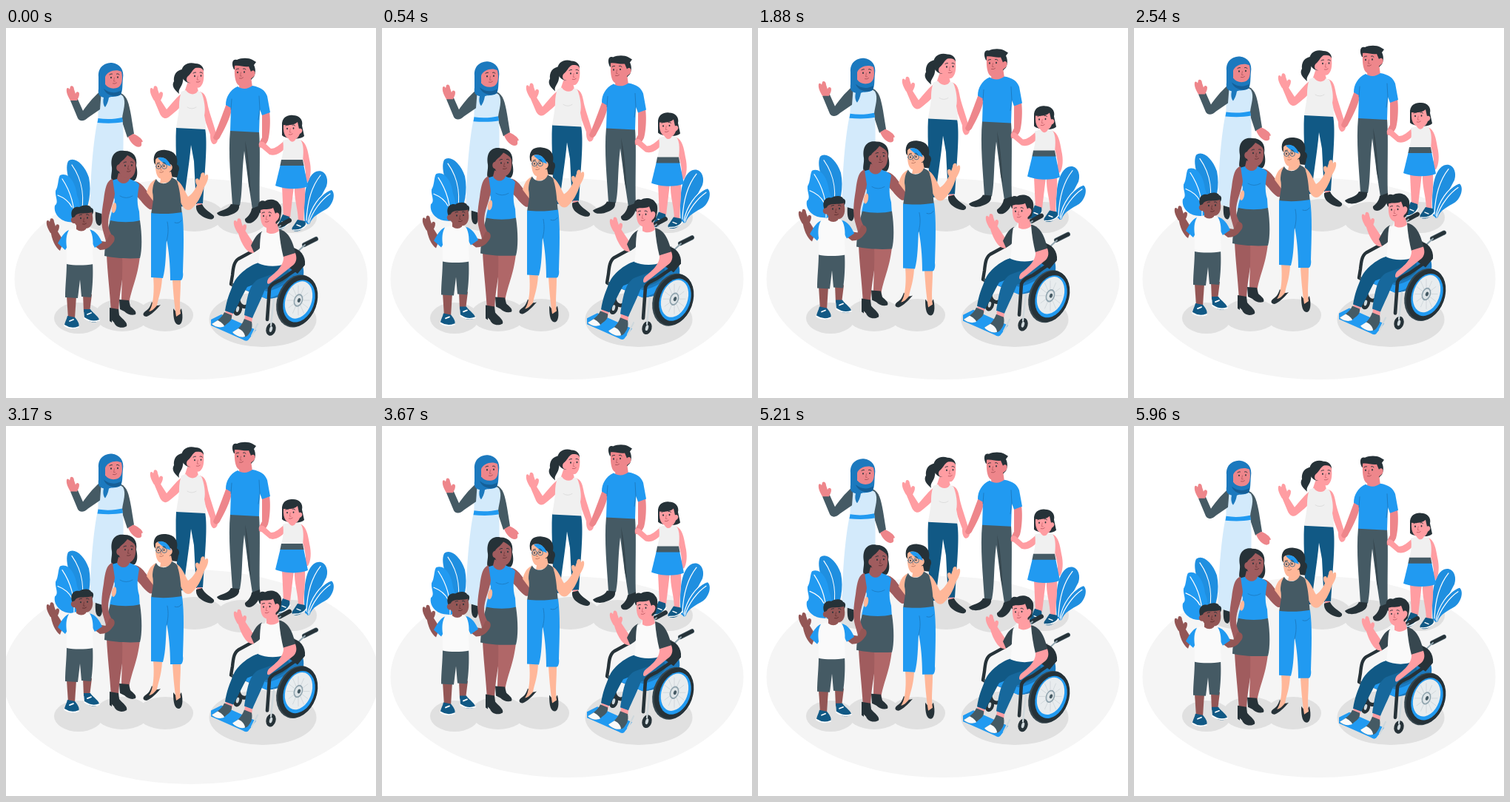
Recreate the animation shown at these times as an HTML page with a canvas. Size 500 by 500 pixels, loop 6000 ms.

```html
<!DOCTYPE html>
<html lang="en">
<head>
<meta charset="utf-8">
<title>People waving</title>
<style>
html, body { margin: 0; width: 100%; height: 100%; overflow: hidden; background: #fff; }
canvas { display: block; width: 500px; height: 500px; }
</style>
</head>
<body>
<canvas id="stage"></canvas>
<script>
const BLUE = '#219af1', DEEP = '#1c79be', LEAF = '#1f8fe0', NAVY = '#115985', PALE = '#d3eafb';
const GREY = '#455a64', DARK = '#37474f', INK = '#263238', SHADE = '#e0e0e0', WHITE = '#fafafa', TOP = '#f0f0f0';
const PINK = '#ff9da2', ROSE = '#ee868b', BROWN = '#a05c5e', UMBER = '#935655', PEACH = '#ffb799';

// Rows are [colour, path] for a fill and [colour, path, width] for a line.
function oval(x, y, rx, ry, deg = 0) {
  const a = deg * Math.PI / 180, dx = rx * Math.cos(a), dy = rx * Math.sin(a);
  return `M${x - dx} ${y - dy}a${rx} ${ry} ${deg} 1 0 ${2 * dx} ${2 * dy}a${rx} ${ry} ${deg} 1 0 ${-2 * dx} ${-2 * dy}Z`;
}

function face(x, y, gap, line) {
  return [
    [INK, oval(x, y, 0.9, 1.2)],
    [INK, oval(x + gap, y - 0.5, 0.9, 1.2)],
    [INK, `M${x - 2} ${y - 4}q2-1.5 3.5-1M${x + gap - 1.5} ${y - 5}q2-1 3.5 1`, 0.9],
    [line, `M${x + gap / 2} ${y}l-1 5h2`, 0.6],
    [line, `M${x + gap / 2 - 2} ${y + 8}q3 1 5-1`, 0.8]
  ];
}

// Raised hand above a wrist; flip is -1 to put the thumb on the left.
function hand(x, y, flip = 1) {
  const f = n => n * flip;
  return `M${x - f(4)} ${y}c${f(-3)}-5 ${f(-6)}-11 ${f(-5)}-16c${f(1)}-2 ${f(3)}-1 ${f(4)} 1l${f(1)}-4` +
    `c${f(2)}-2 ${f(5)} 0 ${f(5)} 4l${f(2)} 6c${f(1)}-4 ${f(5)}-3 ${f(5)} 0c0 4 ${f(-2)} 6 ${f(-3)} 9Z`;
}

function group(rise, ...rows) {
  return { rise, rows: rows.map(([c, d, w]) => ({ c, w, path: new Path2D(d) })) };
}

const shadows = group(0,
  [SHADE, oval(98, 392, 33, 21)], [SHADE, oval(157, 388, 37, 22)], [SHADE, oval(215, 388, 38, 22)],
  [SHADE, oval(136, 254, 34, 20)], [SHADE, oval(254, 253, 40, 22)], [SHADE, oval(318, 257, 35, 22)],
  [SHADE, oval(387, 256, 33, 21)], [SHADE, oval(347, 394, 72.5, 37)]);

const plants = group(10,
  [LEAF, 'M84 180C92 173 106 184 112 202C116 222 112 242 102 262L92 262C98 240 92 224 86 208C82 196 81 186 84 180Z'],
  [BLUE, 'M73 199C84 194 94 208 96 226C102 240 100 254 94 263L84 262C72 260 64 250 66 240C72 236 66 228 67 220C71 214 70 204 73 199Z'],
  ['#fff', 'M89 185C104 206 107 232 100 258M76 204C88 222 93 242 92 262M70 226C80 230 86 236 89 242', 1.2],
  [LEAF, 'M404 262C402 238 402 202 419 194C430 190 437 202 433 214C424 232 414 246 408 265Z'],
  [LEAF, 'M407 265C412 240 428 222 440 219C446 224 442 238 434 244C424 250 414 254 410 265Z'],
  ['#fff', 'M408 262C412 242 424 226 437 219M425 199C413 214 407 236 406 260M438 224C426 232 414 248 409 264', 1.2]);

const scarfWoman = group(10,
  [INK, 'M121 246L129 250C131 258 130 264 127 267C122 267 120 262 121 246Z'],
  [GREY, 'M155 88C164 92 166 102 169 118L173 143L164 148L154 118Z'],
  [ROSE, 'M165 147L172 143C177 145 184 149 185 154C181 153 185 158 182 160C177 163 169 157 165 147Z'],
  [PALE, 'M126 93C134 88 152 86 158 92C163 100 158 112 157 122C160 140 158 170 158 200L157 258C140 254 124 250 114 246C113 210 118 150 124 124C126 112 122 100 126 93Z'],
  [BLUE, 'M124.500 122C136 124 148 123 157 121L158 127C148 129 136 129 123.500 128Z'],
  [GREY, 'M129 84C116 95 108 106 104 112L96 94L87 98L97 122C100 127 106 126 111 121L127 110Z'],
  [ROSE, hand(91, 98)],
  [DEEP, 'M125 66C124 52 134 47 143 47C154 48 160 57 158 68C157 78 158 84 155 90C150 94 142 92 139 94C138 100 136 104 134 107C131 104 131 98 132 94C126 92 124 90 125 82Z'],
  ['#155f98', 'M132 82C140 89 150 88 156 84L155 90C148 94 136 92 132 82Z'],
  [ROSE, 'M134 66C137 58 149 55 156 59C158 68 157 77 152 80C146 83 138 82 134 76Z'],
  ...face(142, 67, 9, '#9c4a50'));

const family = group(20,
  // Woman with ponytail
  [INK, 'M240 56C230 56 226 64 227 72C223 78 228 84 234 89C232 82 238 80 239 72C240 66 242 62 240 56Z'],
  [NAVY, 'M230 134L269 136C272 150 270 180 268 206L266 237L257 238L254 180L250 158C247 190 242 216 240 241L230 242C233 206 228 166 230 134Z'],
  [PINK, 'M258 237h7v5h-7z'],
  [INK, 'M257 240L265 238C268 246 278 250 281 254C282 259 276 260 268 256C262 253 256 248 257 240Z'],
  [PINK, 'M262 86C270 88 271 96 273 106C276 118 282 134 285 146C288 152 284 158 280 157C276 154 276 148 276 144C270 128 264 112 262 100Z'],
  [PINK, 'M246 72L258 78L261 90L240 90Z'],
  [PINK, 'M208 96L217 110C224 102 232 92 240 86L244 100C234 108 226 116 219 121C214 124 210 120 208 116L200 97Z'],
  [PINK, hand(204, 98)],
  [TOP, 'M237 86L243 84C247 91 257 91 259 85L264 87C268 96 270 110 268 118C270 126 270 132 270 137L230 135C232 122 234 112 234 104C234 98 235 92 237 86Z'],
  ['#d8d8d8', 'M245 107q6 4 12 0', 0.8],
  [INK, 'M237 62C236 50 246 45 256 48C264 48 268 54 267 60L250 74C244 75 238 70 237 62Z'],
  [PINK, 'M246 65C250 62 252 56 256 54C261 53 266 54 267 58C268 68 267 76 262 80C258 82 251 79 249 74C243 74 243 67 246 65Z'],
  ...face(255, 65, 8.5, '#b8545e'),
  // Man
  [GREY, 'M303 138L342 140C344 168 342 210 343 241L333 245L328 212L322 166C318 200 320 220 316 240L306 239C304 206 300 170 303 138Z'],
  [DARK, 'M323 152L328 212L331 224C329 196 328 172 323 152Z'],
  [INK, 'M304 238L315 239C316 246 312 250 302 253C294 256 286 254 285 250C290 246 300 246 304 238Z'],
  [INK, 'M332 244L343 240C345 250 340 258 334 262C328 266 322 263 323 258C328 254 331 250 332 244Z'],
  [ROSE, 'M298 102L306 106C304 118 298 132 290 146C288 152 282 154 280 148C284 140 292 118 298 102Z'],
  [ROSE, 'M346 116L356 113C358 128 356 146 354 152C350 160 346 163 342 161C341 156 344 152 346 148Z'],
  [ROSE, 'M316 72L331 66L333 80C328 86 320 86 315 80Z'],
  [BLUE, 'M313 79C320 84 328 82 333 78C344 80 350 84 353 92L357 114L346 118L343 110L342 141L303 139L304 108L297 104C297 94 302 84 313 79Z'],
  [DEEP, 'M342 92L343 110L341 124M305 96L304 110', 0.9],
  [INK, 'M308 56C304 48 306 41 312 43C318 40 328 40 333 43L338 46L335 50C338 56 337 62 335 66L331 70L326 56Z'],
  [ROSE, 'M309 51C315 50 322 53 328 52L331 59C334 56 338 58 336 64C334 67 332 67 331 69C331 76 326 80 320 79C312 79 308 72 309 51Z'],
  ...face(313, 60, 9, '#9c4a50'),
  // Girl
  [PINK, 'M373 214H389L384 256H375Z'], [PINK, 'M390 214H404C405 232 402 246 402 263H395C395 244 389 232 390 214Z'],
  [NAVY, 'M374 252L383 255C385 262 380 268 372 272C366 274 364 270 368 265Z'],
  [NAVY, 'M394 259L404 261C407 266 402 272 396 274C388 276 384 272 388 268Z'],
  ['#fff', 'M368 271Q378 271 384 261M388 273Q400 274 406 266M373 262l5 2M393 266l5 2', 1.4],
  [PINK, 'M376 152C370 158 364 163 358 163L348 154C343 152 340 156 343 160L356 171C364 174 372 168 378 162Z'],
  [PINK, 'M397 151C406 154 408 166 410 178C413 190 412 202 408 208C403 209 402 203 405 196C404 184 400 172 397 166Z'],
  [PINK, 'M382 146h10v10h-10z'],
  [TOP, 'M374 152L382 150C385 155 390 155 392 149L398 151C403 158 402 170 401 180L372 180C374 170 376 162 374 152Z'],
  [BLUE, 'M371 184L402 184L408 214C396 219 376 218 364 213Z'],
  [GREY, 'M372 178H401L402.500 186H370.500Z'],
  [INK, 'M373 132C372 120 382 117 388 118C396 118 402 124 400 132L403 146C400 149 394 150 388 149C382 149 376 148 373 145Z'],
  [PINK, 'M375 131C382 132 390 131 394 127L396 136C401 134 402 141 397 143C395 149 391 151 387 151C379 150 374 145 375 131Z'],
  ...face(380, 136, 8.5, '#b8545e'));

const trio = group(20,
  // Woman in skirt
  [BROWN, 'M136 306H160C160 334 154 348 152 384H142C140 352 137 330 136 306Z'],
  ['#b06768', 'M157 308L181 308C178 338 169 352 166 374L156 374C156 350 158 330 157 308Z'],
  [INK, 'M140 378L152 380L153 388C158 394 165 398 163 403C156 407 148 404 146 398L143 395V398L140 396Z'],
  [INK, 'M153 367L166 368L168 376C172 380 177 383 175 387C170 389 164 387 160 383L154 380Z'],
  [INK, 'M143 188C140 170 150 164 160 166C172 166 178 174 176 186C178 194 178 202 174 206L146 207C139 206 144 196 143 188Z'],
  [BROWN, 'M152 196L167 201L170 212L148 212Z'],
  [BROWN, 'M175 207C186 210 192 224 199 232C203 238 201 247 194 245C186 240 182 232 177 228Z'],
  [BLUE, 'M143 206L150 204C154 212 164 212 167 204C172 206 178 208 180 212C178 224 176 234 180 248L181 264L140 264C141 250 147 240 147 232C143 222 142 214 143 206Z'],
  [DEEP, 'M154 227q8 5 17 0', 0.8],
  [GREY, 'M141 260C154 263 170 263 181 260C184 280 184 300 181 311C164 312 146 311 133 308C134 290 136 276 141 260Z'],
  [BROWN, 'M144 204C136 206 134 216 132 232C129 250 128 262 131 274L135 288C138 294 144 292 145 284C142 278 138 272 138 264C138 250 146 236 147 224Z'],
  [PEACH, oval(146, 243, 3, 7, 10)],
  [BROWN, 'M153 184C155 180 160 178 164 172C168 174 174 177 175 182C176 192 174 200 168 203C160 204 154 199 153 194C148 193 148 185 153 184Z'],
  ...face(161, 186, 9, '#5e3032'),
  // Woman with glasses
  [INK, 'M197 370C200 375 204 376 209 374C204 380 196 388 190 390C185 390 184 386 188 383C193 380 195 376 197 370Z'],
  [INK, 'M226 379C230 385 234 384 237 379C240 392 238 400 234 401C228 401 226 394 226 379Z'],
  [PEACH, 'M199 336L211 338C210 356 206 364 204 375C200 380 196 383 193 383C198 378 201 360 199 336Z'],
  [PEACH, 'M225 340H236C236 362 234 370 236 386L230 390C227 370 226 356 225 340Z'],
  [PEACH, 'M203 204C194 208 192 216 190 222L199 234Z'],
  [PEACH, 'M228 204C238 208 242 222 246 228C252 224 256 218 259 210L268 214C264 228 258 238 250 245C244 248 240 244 236 236Z'],
  [PEACH, hand(264, 215, -1)],
  [INK, 'M200 182C198 168 206 164 216 165C228 166 233 174 231 184C234 190 233 197 231 202L212 200Z'],
  [INK, oval(231, 190, 3, 5)],
  [PEACH, 'M210 198L223 194L226 208L208 210Z'],
  [GREY, 'M203 204C206 212 220 213 224 202C228 204 232 206 232 210C236 222 236 236 238 252L196 252C198 238 200 232 198 222C198 214 200 208 203 204Z'],
  [BLUE, 'M196 250C210 252 226 251 238 249C241 270 240 300 239 330C240 336 238 341 236 341L222 341C222 320 220 300 217 286C216 304 216 324 212 338L196 337C196 318 196 270 196 250Z'],
  [DEEP, 'M218 262C220 272 219 280 217 288M228 263q6 2 9-3', 0.9],
  [PEACH, 'M202 178C204 174 210 174 216 177L221 184C226 184 226 192 221 194C220 200 217 204 213 204C206 205 201 200 202 178Z'],
  [BLUE, 'M205 176C212 172 220 178 223 187C216 185 210 181 205 176Z'],
  ...face(206, 187, 7.5, '#b06a58'),
  [NAVY, oval(206, 187, 3.2, 3.4), 0.7], [NAVY, oval(214, 187, 3.4, 3.4), 0.7],
  // Boy
  [UMBER, 'M82 362H95L93 393H84Z'], [UMBER, 'M104 360H116L113 384H105Z'],
  [NAVY, 'M83 389L93 391C97 396 100 400 98 404C92 408 82 406 79 401C80 396 82 394 83 389Z'],
  [NAVY, 'M105 380L114 380C118 386 126 390 126 395C120 400 110 397 106 391Z'],
  ['#fff', 'M79 402Q88 408 98 404M106 392Q116 399 126 395M86 396l5-2M110 387l5-2', 1.8],
  [GREY, 'M82 316L117 316C118 334 117 350 115 364L102 363L100 340L97 365L80 364C80 348 82 334 82 316Z'],
  [UMBER, hand(64, 277)],
  [UMBER, 'M60 273L68 272L78 288L73 301C66 296 62 286 60 273Z'],
  [UMBER, 'M119 294L129 288L135 289L140 279C147 278 149 286 144 291C140 297 134 300 127 300Z'],
  [BLUE, 'M85 273C78 276 74 284 70 291L80 300L90 284Z'],
  [BLUE, 'M112 272C122 274 126 282 130 290L120 297L114 286Z'],
  [WHITE, 'M85 273C92 270 106 268 113 272C118 280 118 290 117 300L118 319C106 321 92 321 82 319V296C81 288 81 280 85 273Z'],
  [UMBER, 'M95 266h13v6q-6 5-13 0z'],
  [INK, 'M91 260C85 249 90 240 99 242C105 238 114 239 115 243C119 244 119 249 116 253Z'],
  [UMBER, 'M93 255C96 248 108 252 116 249C119 260 117 270 108 271C98 272 95 267 93 264C87 265 86 256 91 256Z'],
  ...face(101, 257, 9, '#55292a'));

function spokes(x, y) {
  let d = '';
  for (let i = 0; i < 12; i++) {
    const a = i * Math.PI / 6;
    d += `M${x} ${y}l${15 * Math.cos(a)} ${20 * Math.sin(a)}`;
  }
  return d;
}

const wheelchair = group(10,
  [INK, 'M370 267L383 260', 6], [GREY, 'M403 293L419 285', 6], [INK, 'M403 293L419 285', 4.5],
  ['#90a4ae', 'M390 306L404 293M362 274L371 267', 2],
  [INK, oval(313, 380, 6, 9, 15)], ['#cfd8dc', oval(313, 380, 2, 4, 15)],
  [INK, oval(325, 360, 11, 17, 15), 5],
  [DEEP, 'M378 300C394 310 404 318 402 334C396 354 372 366 352 366L318 352L340 328Z'],
  [BLUE, 'M330 346L352 356C364 354 376 348 386 340L384 350C374 358 362 364 352 366L320 352Z'],
  [INK, 'M384 296C398 298 405 308 404 320L394 332L380 322Z'],
  [INK, 'M336 300L314 312C308 316 307 324 306 334L304 346L316 352', 4.4],
  [GREY, 'M306 346L312 372', 2.2],
  [BLUE, 'M277 394L291 387L338 408L327 422Q324 424 320 421L277 402Z'],
  [PINK, 'M297 380L307 384L305 392L296 389Z'], [PINK, 'M323 387L333 391L332 400L322 397Z'],
  [NAVY, 'M342 317C330 320 314 332 308 344C302 358 298 368 296 382L307 386C313 376 319 362 326 350L352 340C362 336 376 330 378 318Z'],
  ['#17689c', 'M378 317C374 332 352 334 340 340C328 348 326 364 322 388L333 392C338 380 346 364 350 353C362 350 378 345 384 334Z'],
  [GREY, 'M295 384L305 388C306 396 300 398 296 402C290 406 282 404 278 400C284 396 292 392 295 384Z'],
  [GREY, 'M322 393L332 397C334 406 330 412 326 416C320 420 310 416 306 411C312 408 318 404 322 393Z'],
  [WHITE, 'M286 395C290 397 294 400 295 403C290 406 282 404 278 400Z'],
  [WHITE, 'M314 406C319 408 323 413 323 417C318 419 310 416 306 411Z'],
  [PINK, 'M312 270L322 272L334 290L335 304C324 305 316 288 312 270Z'],
  [PINK, hand(317, 277)],
  [DARK, 'M346 275C338 278 334 288 331 294L335 303C342 300 345 296 347 290Z'],
  [WHITE, 'M345 276C352 278 364 276 370 272C377 284 379 306 378 318C366 324 350 322 341 318C344 304 342 288 345 276Z'],
  [PINK, 'M352 266L366 262L369 274C364 279 356 279 352 276Z'],
  [DARK, 'M369 272C382 274 388 290 391 304L375 310C372 298 370 286 369 272Z'],
  [PINK, 'M375 309L391 304C394 312 392 318 386 322C376 330 366 338 358 344C352 349 352 342 355 338C362 332 376 322 375 309Z'],
  [INK, 'M343 250C337 238 343 231 350 234C356 230 366 232 369 237C375 242 371 254 370 260L365 265L358 248Z'],
  [PINK, 'M344 246C349 244 356 246 361 243L364 251C367 247 372 252 368 258C366 261 365 260 364 264C362 270 356 271 352 270C346 268 343 262 344 246Z'],
  ...face(348, 254, 8.5, '#b8545e'),
  [INK, oval(358, 407, 6.5, 9, 15)], ['#cfd8dc', oval(358, 407, 2, 4, 15)],
  ['#cfd8dc', 'M356 352L353 394M362 366L358 402M340 400L332 416', 2.2],
  [INK, 'M353 394L356 352C358 346 364 344 372 340L401 320', 4.6],
  [DARK, oval(393, 369, 26.5, 36.5, 20)],
  [INK, oval(394.5, 369, 25.5, 35.5, 20)],
  [BLUE, oval(396, 369, 20.5, 29.5, 20)],
  ['#e8ecee', oval(395.5, 367.5, 17.5, 26, 20)],
  ['#c3ccd1', spokes(395, 368), 0.6],
  ['#90a4ae', oval(395, 368, 6, 9, 20)], ['#dfe5e8', oval(395, 368, 4.5, 7, 20)], [GREY, oval(396, 368, 2, 3, 20)]);

const scenes = [shadows, plants, scarfWoman, family, trio, wheelchair];
const LOOP = 6000, FPS = 24, STEPS = LOOP * FPS / 1000;
const canvas = document.getElementById('stage'), ctx = canvas.getContext('2d');
const ratio = window.devicePixelRatio || 1;
canvas.width = canvas.height = 500 * ratio;

// The floor beats once a second, for five steps.
function drawFloor(step) {
  const beat = step % FPS / 5;
  const scale = beat < 1 ? 1 + 0.113 * Math.sin(Math.PI * beat) : 1;
  ctx.fillStyle = '#f5f5f5';
  ctx.fill(new Path2D(oval(250, 339, 238.5 * scale, 136 * scale)));
}

function drawGroup({ rise, rows }, lift) {
  ctx.save();
  ctx.translate(0, -rise * lift);
  for (const { c, w, path } of rows) {
    if (w) {
      ctx.strokeStyle = c;
      ctx.lineWidth = w;
      ctx.stroke(path);
    } else {
      ctx.fillStyle = c;
      ctx.fill(path);
    }
  }
  ctx.restore();
}

function draw(ms) {
  const step = Math.floor((ms % LOOP + 5) * FPS / 1000) % STEPS;
  const lift = 1 - Math.abs(1 - 2 * step / STEPS);
  ctx.setTransform(ratio, 0, 0, ratio, 0, 0);
  ctx.lineCap = ctx.lineJoin = 'round';
  ctx.fillStyle = '#fff';
  ctx.fillRect(0, 0, 500, 500);
  drawFloor(step);
  for (const g of scenes) drawGroup(g, lift);
}

const start = performance.now();
function tick() {
  draw(performance.now() - start);
  requestAnimationFrame(tick);
}
tick();
</script>
</body>
</html>
```
